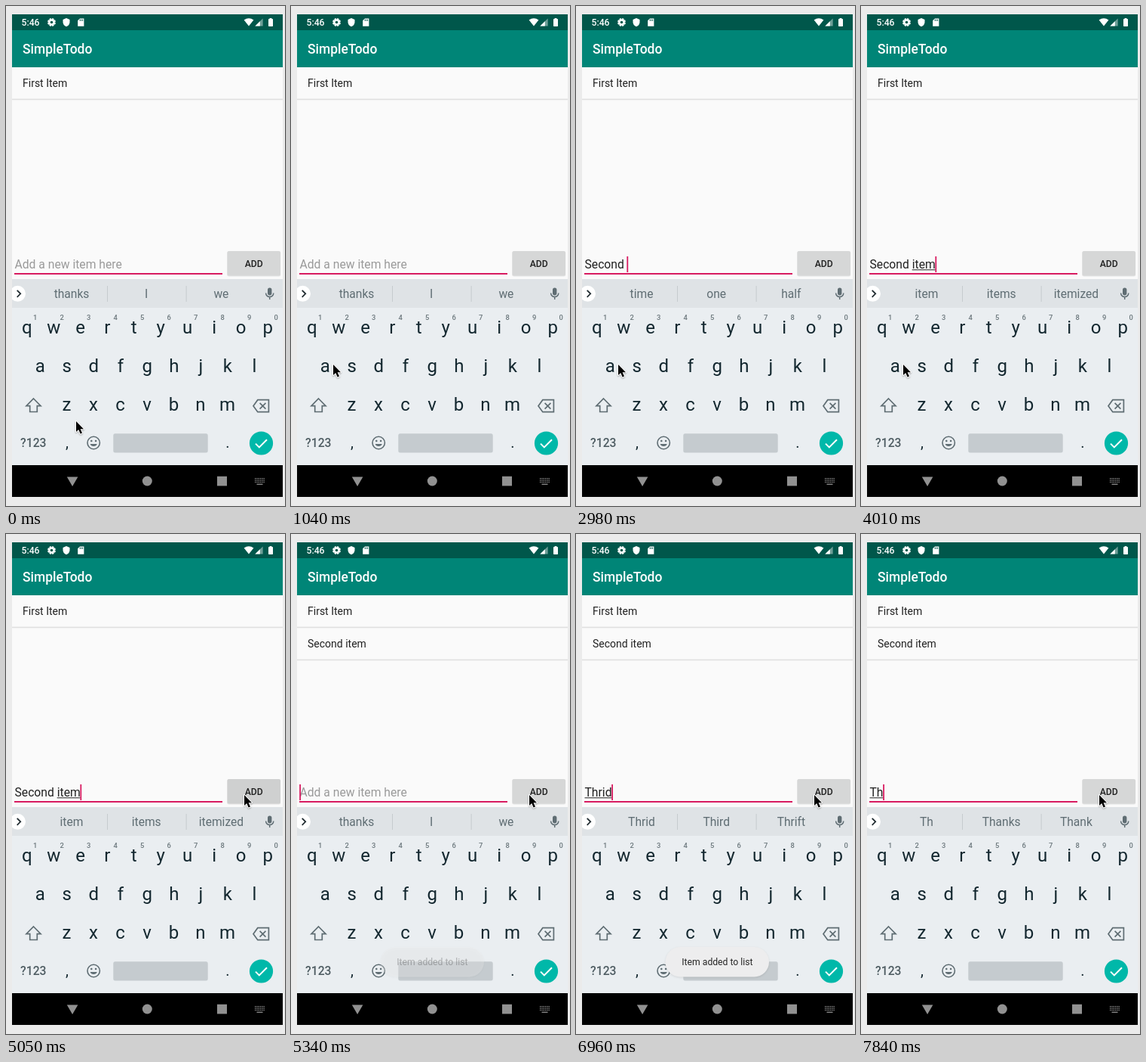
These frames come from a looping animation (370x661 px, 8000 ms). An HTML page with a canvas:

```html
<!DOCTYPE html>
<html lang="en">
<head>
<meta charset="utf-8">
<title>Todo list</title>
<style>
  html, body { margin: 0; width: 100%; height: 100%; overflow: hidden; background: #ebebeb; }
  canvas { display: block; width: 370px; height: 661px; }
</style>
</head>
<body>
<canvas id="stage"></canvas>
<script>
const W = 370, H = 661, LOOP = 8000, STEP = 148;
const canvas = document.getElementById('stage');
const ctx = canvas.getContext('2d');
const ratio = window.devicePixelRatio || 1;
canvas.width = W * ratio;
canvas.height = H * ratio;

const INK = '#13272f', SOFT = '#5f6d73', PINK = '#d81b60';

// [time, typed text, suggestions]
const edits = [
  [-740, '', 'thanks|I|we'],
  [1480, 'S', 'S|So|Sorry'],
  [1780, 'Se', 'Se|See|Send'],
  [1930, 'Sec', 'Sec|SEC|Second'],
  [2080, 'Seco', 'Seco|Second|Seconds'],
  [2230, 'Secon', 'Secon|Second|Seconds'],
  [2380, 'Second', 'Second|Seconds|Secondary'],
  [2530, 'Second ', 'time|one|half'],
  [3270, 'Second i', 'i|is|in'],
  [3720, 'Second it', 'it|its|item'],
  [3860, 'Second ite', 'ite|item|items'],
  [4010, 'Second item', 'item|items|itemized'],
  [5190, '', 'thanks|I|we'],
  [6230, 'T', 'T|Thanks|Thank'],
  [6380, 'Th', 'Th|Thanks|Thank'],
  [6530, 'Thr', 'Thr|Three|Through'],
  [6670, 'Thri', 'Thri|Thrift|Thrive'],
  [6820, 'Thrid', 'Thrid|Third|Thrift'],
  [7250, 'Thri', 'Thri|Thrift|Thrive'],
  [7400, 'Thr', 'Thr|Three|Through'],
  [7550, 'Th', 'Th|Thanks|Thank']
];
// [time, x, y]
const pointer = [
  [0, 92, 548], [140, 94, 535], [290, 97, 505], [440, 97, 481],
  [740, 85, 479], [890, 64, 474], [1040, 55, 473],
  [4310, 80, 461], [4450, 160, 421], [4600, 245, 379], [4750, 302, 350], [4900, 315, 344]
];
// [time, opacity]
const toast = [
  [0, 0], [5340, .3], [5480, .6], [5630, .9], [5780, 1],
  [7250, .8], [7400, .5], [7550, .25], [7690, .06], [7840, 0]
];

const at = (list, t) => list.reduce((last, e) => e[0] <= t ? e : last);

function rect(x, y, w, h, color) {
  ctx.fillStyle = color;
  ctx.fillRect(x, y, w, h);
}
function disc(x, y, r, color) {
  ctx.beginPath();
  ctx.arc(x, y, r, 0, 7);
  ctx.fillStyle = color;
  ctx.fill();
}
function pill(x, y, w, h, r, color) {
  ctx.beginPath();
  ctx.roundRect(x, y, w, h, r);
  ctx.fillStyle = color;
  ctx.fill();
}
function fillPath(d, color) {
  ctx.fillStyle = color;
  ctx.fill(new Path2D(d));
}
function strokePath(d, color, width) {
  ctx.strokeStyle = color;
  ctx.lineWidth = width;
  ctx.stroke(new Path2D(d));
}
function label(str, x, y, size, color, weight = 400, align = 'left') {
  ctx.font = `${weight} ${size}px Roboto, sans-serif`;
  ctx.textAlign = align;
  ctx.fillStyle = color;
  ctx.fillText(str, x, y);
}

function statusBar() {
  rect(8, 11, 359, 21, '#00574b');
  label('5:46', 20.5, 26, 12.2, '#fff', 500);
  for (let i = 0; i < 4; i++) {
    ctx.save();
    ctx.translate(60.5, 21.5);
    ctx.rotate(i * Math.PI / 4 + Math.PI / 8);
    rect(-1.3, -5.4, 2.6, 10.8, '#fff');
    ctx.restore();
  }
  disc(60.5, 21.5, 4.1, '#fff');
  disc(60.5, 21.5, 1.8, '#00574b');
  fillPath('M80 16L84.5 18V21.5Q84.3 25.5 80 27.2Q75.7 25.5 75.5 21.5V18Z', '#fff');
  fillPath('M98 16.4H103.4V26.8H95.2V19.2Z', '#fff');
  for (let i = 0; i < 3; i++) rect(97.6 + i * 1.8, 17.6, .9, 2.2, '#00574b');
  fillPath('M315.6 18.6Q322 14 328.4 18.6L322 26.6Z', '#fff');
  fillPath('M340.6 16.4V26.6H330.4Z', '#6f9f98');
  fillPath('M336.8 20.2V26.6H330.4Z', '#fff');
  rect(349.6, 16, 2.8, 1.6, '#fff');
  pill(348, 17, 6, 10, .8, '#fff');
}

function appBody(t, text, caretOn) {
  rect(8, 32, 359, 49, '#008577');
  label('SimpleTodo', 22, 63, 17.46, '#fff', 500);
  rect(8, 81, 359, 280, '#fafafa');
  const items = t < 5190 ? ['First Item'] : ['First Item', 'Second item'];
  items.forEach((item, i) => {
    label(item, 22, 107 + i * 43, 14, '#212121');
    rect(8, 122.6 + i * 43, 359, 1.7, '#e0e0e0');
  });

  if (text) {
    label(text, 11.5, 347, 15.7, '#212121');
    const start = text.lastIndexOf(' ') + 1;
    const x = 11.5 + ctx.measureText(text.slice(0, start)).width;
    rect(x, 348.3, ctx.measureText(text.slice(start)).width, 1, '#212121');
  } else {
    label('Add a new item here', 11.5, 347, 15.7, '#9a9a9a');
  }
  if (caretOn) rect(11.2 + (text ? ctx.measureText(text).width : 0), 331, 1.8, 21, PINK);
  rect(11, 353, 276, 2, PINK);

  pill(293.2, 324.6, 71, 33, 2, '#e4e4e4');
  pill(293.5, 324, 70.5, 32.6, 2, t >= 5050 && t < 5190 ? '#cfd0d0' : '#d6d7d7');
  label('ADD', 328.7, 345, 12.2, '#212121', 500, 'center');
}

function suggestions(words) {
  rect(8, 361, 359, 38, '#dfe3e6');
  words.split('|').forEach((word, i) =>
    label(word, 87 + i * 99.2, 386, 15.6, SOFT, 400, 'center'));
  rect(134, 370, 1, 21, '#c5cbce');
  rect(238.6, 370, 1, 21, '#c5cbce');
  ctx.save();
  ctx.beginPath();
  ctx.rect(8, 361, 40, 38);
  ctx.clip();
  disc(15.5, 380.3, 10.5, '#fff');
  ctx.restore();
  strokePath('M14.7 375.8L19.2 380.3L14.7 384.8', '#222d32', 1.8);
  pill(347, 372.5, 5.4, 10, 2.7, SOFT);
  strokePath('M344.6 379.5A5.1 5.1 0 0 0 354.8 379.5M349.7 384.5V388', SOFT, 1.5);
}

function keyboard(upper) {
  rect(8, 399, 359, 208, '#eaeef1');
  const rows = [['qwertyuiop', 27.7, 433], ['asdfghjkl', 45.3, 484], ['zxcvbnm', 80.5, 535.3]];
  for (const [keys, x, y] of rows) {
    [...keys].forEach((k, i) =>
      label(upper ? k.toUpperCase() : k, x + i * 35.5, y, 24, INK, 400, 'center'));
  }
  [...'1234567890'].forEach((n, i) =>
    label(n, 38.6 + i * 35.5, 415.3, 9.4, '#6b777c', 500, 'center'));

  const shift = 'M36.5 519L46 528.6H41.3V536.5H31.7V528.6H27Z';
  if (upper) fillPath(shift, SOFT);
  strokePath(shift, SOFT, 1.7);
  strokePath('M333.8 520.7H348.4V536.7H333.8L328 528.7ZM336.6 524.8L344.4 532.6M344.4 524.8L336.6 532.6', SOFT, 1.7);

  label('?123', 36.3, 583, 15.7, '#4f5d63', 500, 'center');
  label(',', 81, 584, 20, INK, 400, 'center');
  label('.', 294, 584, 20, INK, 400, 'center');
  strokePath('M124.4 577.5A8.2 8.2 0 1 1 108 577.5A8.2 8.2 0 1 1 124.4 577.5', SOFT, 1.6);
  disc(113.3, 575, 1.3, SOFT);
  disc(119.1, 575, 1.3, SOFT);
  fillPath('M111.6 579H120.8A4.8 4.2 0 0 1 111.6 579Z', SOFT);
  pill(142.3, 565.3, 125.4, 25.2, 2.5, '#c5cbcf');
  disc(338.5, 578, 15.6, '#00b8a9');
  strokePath('M331 578.6L335.8 583.4L346 573.2', '#fff', 2);
}

function navBar() {
  rect(8, 607, 359, 42, '#000');
  const gray = '#919191';
  fillPath('M80.8 622.6H95.4L88.1 635Z', gray);
  disc(187.3, 628, 6.5, gray);
  rect(280, 621.8, 13, 12.6, gray);
  for (let row = 0; row < 3; row++)
    for (let i = 0; i < 6; i++) rect(330 + i * 2.3, 624 + row * 2.4, 1.3, 1.3, gray);
  rect(332.5, 631.6, 8, 1.3, gray);
}

function drawToast(alpha) {
  if (!alpha) return;
  ctx.save();
  ctx.globalAlpha = alpha;
  ctx.shadowColor = 'rgba(0,0,0,.1)';
  ctx.shadowBlur = 3 * ratio;
  ctx.shadowOffsetY = ratio;
  pill(118.5, 546, 137.5, 39.5, 19.7, '#ededee');
  ctx.shadowColor = 'transparent';
  label('Item added to list', 187.4, 570, 12.2, '#262626', 400, 'center');
  ctx.restore();
}

function drawPointer(x, y) {
  ctx.save();
  ctx.translate(x, y);
  ctx.lineJoin = 'round';
  const arrow = 'M1 1V15L4.2 12L6.6 17.6L9 16.6L6.6 11.2H11Z';
  ctx.shadowColor = 'rgba(0,0,0,.3)';
  ctx.shadowBlur = 2 * ratio;
  ctx.shadowOffsetY = ratio;
  strokePath(arrow, '#fff', 2);
  ctx.shadowColor = 'transparent';
  fillPath(arrow, '#000');
  ctx.restore();
}

function draw(now) {
  const t = now % LOOP;
  const [edited, text, words] = at(edits, t);
  const tick = Math.floor((t + 8) / STEP) * STEP;
  const caretOn = Math.max(0, tick - edited) % 1000 < 440 && !(edited < 0 && t < 140);

  ctx.setTransform(ratio, 0, 0, ratio, 0, 0);
  rect(0, 0, W, H, '#ebebeb');
  statusBar();
  appBody(t, text, caretOn);
  suggestions(words);
  keyboard(t >= 1330 && t < 1480);
  navBar();
  drawToast(at(toast, t)[1]);
  const [, x, y] = at(pointer, t);
  drawPointer(x, y);
  requestAnimationFrame(frame);
}

let start;
function frame(now) {
  start ??= now;
  draw(now - start);
}
requestAnimationFrame(frame);
</script>
</body>
</html>
```
